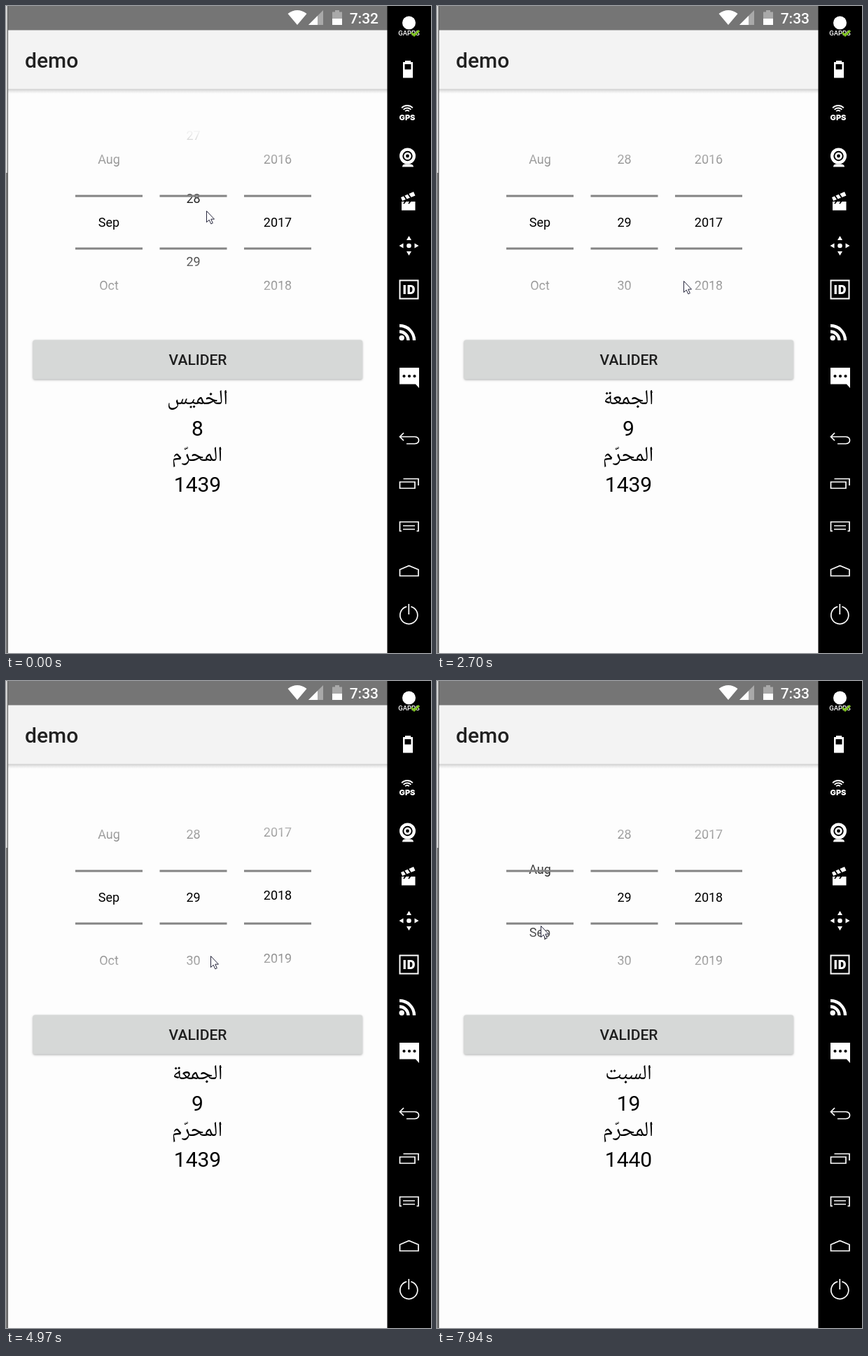
An HTML page with a canvas for the animation above (8000 ms loop, 607 px wide and 923 px high).

```html
<!DOCTYPE html>
<html lang="fr">
<head>
<meta charset="utf-8">
<style>
html, body { margin: 0; width: 100%; height: 100%; overflow: hidden; background: #fdfdfd; }
canvas { display: block; }
</style>
</head>
<body>
<canvas id="stage" width="607" height="923"></canvas>
<script>
const ctx = document.getElementById('stage').getContext('2d');
const LOOP = 8000, STEP = 135, PITCH = 90, MID = 309;
const SANS = 'Roboto, "Open Sans", sans-serif';
const ARABIC = '"Noto Naskh Arabic UI", "Noto Naskh Arabic", "Noto Sans Arabic", "DejaVu Sans", sans-serif';

// The screen refreshes in even steps, counted from the start of each gesture
const gestures = [0, 710, 1860, 2560, 3480, 4560, 6080, 7200, 7790];
const presses = [1860, 6080];

// Pointer moves: start, end, x, y
const moves = [
  [600, 850, 245, 420], [850, 1270, 267, 502], [2450, 2820, 363, 378], [3400, 3615, 370, 297],
  [3615, 4430, 369, 212], [4560, 4965, 292, 392], [4965, 5370, 270, 498],
  [6300, 7200, 152, 251], [7655, 7925, 148, 349]
];

const clamp = v => Math.min(1, Math.max(0, v));

function stepped(t) {
  const start = gestures.filter(g => g <= t).pop();
  return start + Math.floor((t - start) / STEP) * STEP;
}

function pointer(t) {
  let x = 286, y = 292;
  for (const [a, b, tx, ty] of moves) {
    const p = clamp((t - a) / (b - a)), e = p * (2 - p);
    x += (tx - x) * e;
    y += (ty - y) * e;
  }
  return [x, y];
}

// Decelerating settle of a wheel
const snap = (from, to, start, dur, t) => to + (from - to) * (1 - clamp((t - start) / dur)) ** 5;

const dayShift = t => snap(-34, -PITCH, 0, 650, t);
const monthShift = t => t < 7700 ? 0 : Math.max(0, pointer(t)[1] - 299);
function yearShift(t) {
  if (t < 3480) return 0;
  return t < 4500 ? Math.min(0, pointer(t)[1] - 324) : snap(-112, -PITCH, 4690, 800, t);
}

function pressed(t) {
  const start = presses.find(s => t >= s && t < s + 390);
  return start ? Math.min(1, 0.75 + (t - start) / 500) : 0;
}

function rect(x, y, w, h, color) {
  ctx.fillStyle = color;
  ctx.fillRect(x, y, w, h);
}

function text(s, x, y, font, color = '#000', align = 'center') {
  ctx.font = font;
  ctx.fillStyle = color;
  ctx.textAlign = align;
  ctx.fillText(s, x, y);
}

// Centres the visible ink rather than the advance width
function inkText(s, x, y, font) {
  ctx.font = font;
  ctx.textAlign = 'left';
  const m = ctx.measureText(s);
  text(s, x + (m.actualBoundingBoxLeft - m.actualBoundingBoxRight) / 2, y, font, '#000', 'left');
}

function disc(x, y, r, color = '#fff') {
  ctx.fillStyle = color;
  ctx.beginPath();
  ctx.arc(x, y, r, 0, 7);
  ctx.fill();
}

function arc(x, y, r, a, b, w) {
  ctx.lineWidth = w;
  ctx.beginPath();
  ctx.arc(x, y, r, a, b);
  ctx.stroke();
}

function shape(d, fill, stroke, w = 1.7) {
  const p = new Path2D(d);
  if (fill) { ctx.fillStyle = fill; ctx.fill(p); }
  if (stroke) { ctx.strokeStyle = stroke; ctx.lineWidth = w; ctx.stroke(p); }
}

// items[2] rests on the middle row when shift is 0
function wheel(x, items, shift) {
  const fade = ctx.createLinearGradient(0, MID - 135, 0, MID + 135);
  fade.addColorStop(0, 'rgba(0,0,0,0)');
  fade.addColorStop(0.45, '#000');
  fade.addColorStop(0.55, '#000');
  fade.addColorStop(1, 'rgba(0,0,0,0)');
  items.forEach((s, i) => {
    const dy = Math.round((i - 2) * PITCH + shift);
    if (Math.abs(dy) < 128) text(s, x, MID + 6 + dy, '18px ' + SANS, fade);
  });
  for (const y of [269.5, 344.5]) rect(x - 48, y, 96, 3, '#848484');
}

function button(raise) {
  ctx.save();
  ctx.shadowColor = `rgba(0,0,0,${0.3 + raise * 0.06})`;
  ctx.shadowBlur = 3 + raise * 6;
  ctx.shadowOffsetY = 1 + raise * 2;
  ctx.fillStyle = raise ? '#d1d3d2' : '#d6d8d7';
  ctx.beginPath();
  ctx.roundRect(38.5, 476.5, 470.5, 56, 3);
  ctx.fill();
  ctx.restore();
  text('VALIDER', 274, 512, '500 21px ' + SANS, '#1e1e1e');
}

function statusBar(t) {
  rect(0, 0, 545, 34.5, '#757575');
  shape('M416 27 L402.5 11 Q416 1 429.5 11 Z', '#fff');
  shape('M432 27 L453 6 V27 Z', '#a9a9a9');
  shape('M432 27 L445 14 V27 Z', '#fff');
  shape('M470 6 H476 V8.5 H480 V27 H466 V8.5 H470 Z', '#a9a9a9');
  rect(466, 18, 14, 9, '#fff');
  text(t < 840 ? '7:32' : '7:33', 532, 24.5, '500 21px ' + SANS, '#fff', 'right');
}

function appBar() {
  const g = ctx.createLinearGradient(0, 118, 0, 125);
  g.addColorStop(0, '#c4c4c4');
  g.addColorStop(0.4, '#e4e4e4');
  g.addColorStop(1, '#fdfdfd');
  rect(0, 118, 545, 7, g);
  rect(0, 34.5, 545, 84, '#f3f3f3');
  text('demo', 27, 88, '500 30px ' + SANS, '#212121', 'left');
}

function sidebar() {
  const W = '#fff', K = '#000', TOP = -Math.PI / 2;
  rect(544.5, 0, 63, 923, K);
  disc(575.5, 24, 9.5);
  text('GAPPS', 575.5, 42, '500 9.5px ' + SANS, W);
  shape('M579 38 L583 42 L590 35', null, '#7dc21e', 3);

  // battery
  shape('M570 78 H578 V80 H581 V102.5 H567 V80 H570 Z', W);
  rect(569.5, 83, 9, 7.5, K);

  // location
  ctx.strokeStyle = W;
  for (let i = 0; i < 3; i++) arc(573, 153, 4 + 3.5 * i, TOP - 0.8, TOP + 0.8, 1.8);
  text('GPS', 573, 162.5, '900 11px Inter, sans-serif', W);

  // camera
  disc(573.5, 214, 11.5);
  ctx.strokeStyle = K;
  arc(573.5, 214, 6.2, 0, 7, 2);
  disc(573.5, 214, 2.4, K);
  shape('M566 229.5 Q566 226 570 225.5 H577 Q582 226 582 229.5 Z', W);

  // clapperboard
  rect(565, 279, 19.5, 12.5, W);
  shape('M564 273 L582 265 L584.5 270.5 L566 278 Z', W);
  shape('M568 270 L572 276 M574 267.5 L578 273.5 M568 282 L571 278 M575 282 L578 278', null, K, 1.8);

  // four-way arrows
  disc(575.5, 342, 3.3);
  for (let i = 0; i < 4; i++) {
    ctx.save();
    ctx.translate(575.5, 342);
    ctx.rotate(i * Math.PI / 2);
    shape('M0 -14 L3.5 -8 H-3.5 Z', W);
    ctx.restore();
  }

  shape('M562.5 391.5 H588.5 V417.5 H562.5 Z', null, W, 2);
  text('ID', 575.5, 411, '800 17px "Open Sans", sans-serif', W);

  // feed
  disc(565.2, 473.5, 3.7);
  ctx.strokeStyle = W;
  for (const r of [12.5, 21]) arc(562, 477, r, TOP, 0, 4.3);

  // message
  shape('M562 516 H590 V545 L585 539.5 H562 Z', W);
  for (let i = -1; i < 2; i++) disc(576 + i * 7.5, 528, 2.1, K);

  // back, recents, menu, home, power
  shape('M568 609 L562.5 614.5 L568 620 M562.5 614.5 H584 Q589.5 615 589.5 619.5 Q589.5 624 584 624.5 H572', null, W);
  shape('M562.5 679 H584 V688 H562.5 Z M567.5 674.5 H589 V684', null, W);
  shape('M565 749 H562.5 V736 H589 V749 H586.5 M567 741.5 H584 M567 746.5 H584', null, W);
  shape('M562.5 813 V804 L575.5 798.5 L589 804 V813 Z', null, W);
  arc(575.3, 869, 12.5, TOP + 0.25, TOP + 6.03, 1.7);
  shape('M575.3 853 V868', null, W);
}

function frameEdge() {
  rect(0, 0, 2, 238, '#d2d2d2');
  rect(0, 238, 2, 685, '#777');
  rect(2, 0, 1, 923, '#5c5c5c');
}

function result(t) {
  const [day, num, year] = t < 1990 ? ['الخميس', '8', '1439']
    : t < 6200 ? ['الجمعة', '9', '1439'] : ['السبت', '19', '1440'];
  inkText(day, 274, 568, '30px ' + ARABIC);
  text(num, 273.5, 612.5, '30px ' + SANS);
  inkText('المحرّم', 273.5, 649, '30px ' + ARABIC);
  text(year, 273.5, 693, '30px ' + SANS);
}

function cursor(x, y) {
  ctx.save();
  ctx.translate(Math.round(x) + 0.5, Math.round(y) + 0.5);
  shape('M0 0 V16 L3.7 12.6 L6.3 18.3 L8.8 17.2 L6.3 11.6 H11 Z', '#fff', '#26263c', 1);
  ctx.restore();
}

function draw(t) {
  rect(0, 0, 607, 923, '#fdfdfd');
  appBar();
  statusBar(t);
  wheel(147, ['Jul', 'Aug', 'Sep', 'Oct', 'Nov'], monthShift(t));
  wheel(267.5, ['26', '27', '28', '29', '30', '1'], dayShift(t));
  wheel(388, Array.from({ length: 6 }, (_, i) => String(2015 + i)), yearShift(t));
  button(pressed(t));
  result(t);
  frameEdge();
  sidebar();
  cursor(...pointer(t));
}

function loop(now) {
  draw(stepped(now % LOOP));
  requestAnimationFrame(loop);
}
draw(0);
requestAnimationFrame(loop);
</script>
</body>
</html>
```
